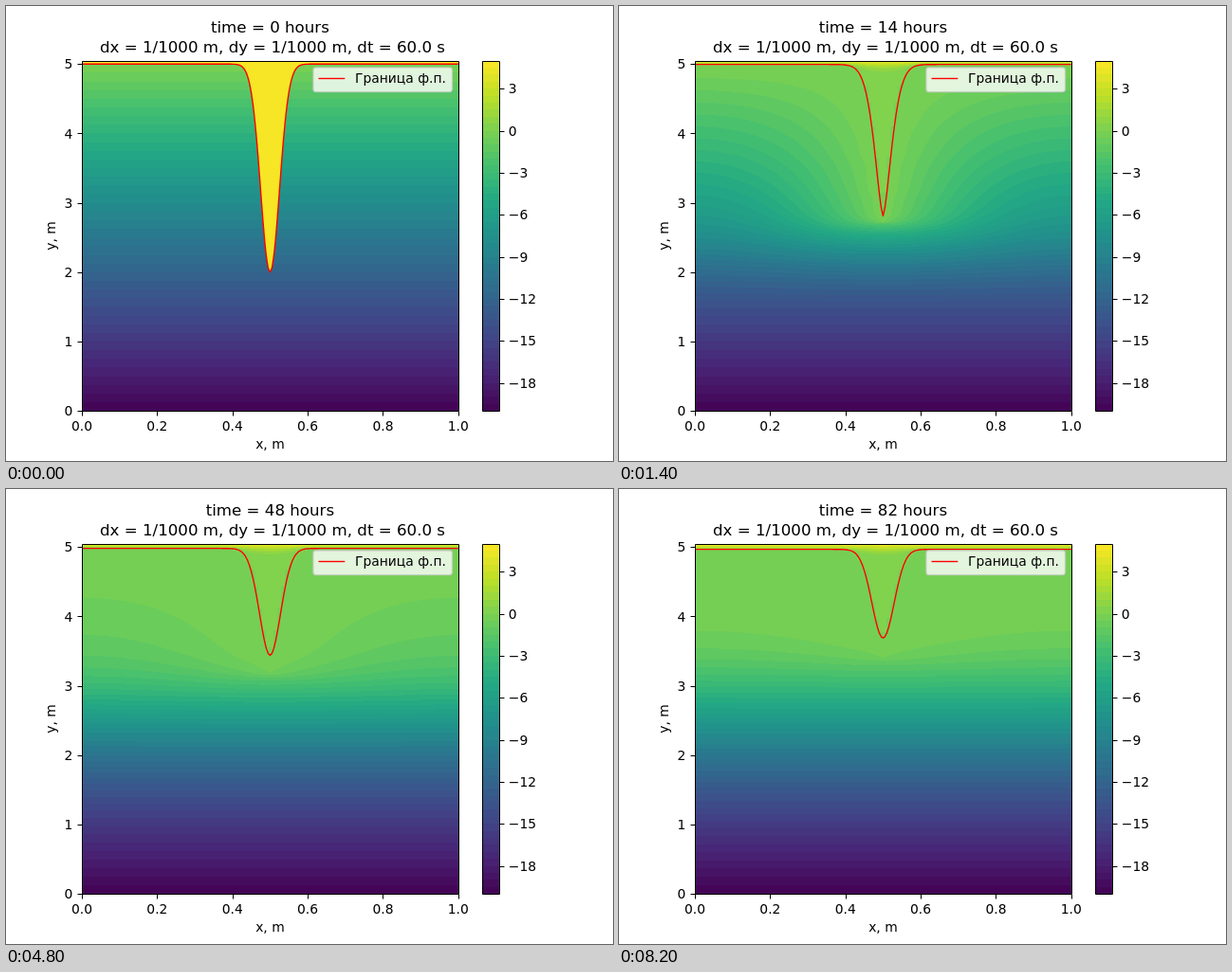
Animation of 640 by 480 pixels, one loop 8.4 s. Source, as an HTML page with a canvas:

```html
<!DOCTYPE html>
<html lang="ru">
<head>
<meta charset="utf-8">
<style>
  html, body { margin: 0; width: 100%; height: 100%; overflow: hidden; background: #fff; }
  canvas { display: block; }
</style>
</head>
<body>
<canvas id="stage" width="640" height="480"></canvas>
<script>
const ctx = document.getElementById('stage').getContext('2d');
const FRAMES = 42, FRAME_MS = 200, HOURS = 2;
const LEFT = 80, RIGHT = 476.8, TOP = 57.6, BOTTOM = 427.2, HEIGHT = 5.05;
const toX = x => LEFT + x * (RIGHT - LEFT);
const toY = y => BOTTOM - y / HEIGHT * (BOTTOM - TOP);
const snap = v => Math.floor(v + 0.5) + 0.5;

// Viridis, cut into half-degree bands from -20 to 5
const STOPS = [0x440154, 0x482475, 0x414487, 0x355f8d, 0x2a788e, 0x21918c,
  0x22a884, 0x44bf70, 0x7ad151, 0xbddf26, 0xfde725];
const BANDS = 50;
const palette = Array.from({ length: BANDS }, (_, i) => {
  const s = (i + 0.5) / BANDS * 10, k = Math.floor(s);
  return [16, 8, 0].map(b => {
    const lo = STOPS[k] >> b & 255, hi = STOPS[k + 1] >> b & 255;
    return Math.round(lo + (hi - lo) * (s - k));
  });
});
const band = t => palette[Math.max(0, Math.min(BANDS - 1, Math.floor((t + 20) * 2)))];

// Thawed wedge over time: hour, tip height, height of the -0.5 degree tip, width, exponent
const WEDGE = [
  [0, 2, 2, 0.0354, 2],
  [2, 2.28, 2.25, 0.033, 1.6],
  [8, 2.64, 2.58, 0.0311, 1.5],
  [22, 3.04, 2.88, 0.034, 1.6],
  [34, 3.31, 3.02, 0.038, 1.8],
  [48, 3.44, 3.17, 0.04, 1.95],
  [58, 3.52, 3.24, 0.041, 2],
  [82, 3.69, 3.39, 0.0417, 2]
];
function wedgeAt(hour) {
  const k = Math.max(1, WEDGE.findIndex(row => row[0] >= hour));
  const a = WEDGE[k - 1], b = WEDGE[k], s = (hour - a[0]) / (b[0] - a[0]);
  const [, tip, soft, width, power] = a.map((v, i) => v + (b[i] - v) * s);
  const top = 5 - 0.033 * hour / 82;
  const shape = x => Math.exp(-((Math.abs(x) / width) ** power));
  return {
    front: x => top - (top - tip) * shape(x),
    mush: x => top - (top - soft) * shape(x)
  };
}

// Heat conduction on the right half of the symmetric domain
const DX = 0.01, DY = 0.025, NX = 51, NY = 203;
const DT = 36, STEPS = HOURS * 3600 / DT;
const ICE = 1.05e-6 * DT, WATER = 1.4e-7 * DT, RX = 1 / DX ** 2, RY = 1 / DY ** 2;
const ground = y => -20 + 4 * y;

function simulate() {
  let now = new Float64Array(NX * NY);
  const start = wedgeAt(0);
  for (let j = 0; j < NY; j++)
    for (let i = 0; i < NX; i++)
      now[j * NX + i] = j * DY > start.front(i * DX) + 1e-9 ? 5 : ground(j * DY);
  let next = now.slice();
  const fields = [now.slice()];
  const front = new Float64Array(NX), mush = new Float64Array(NX);
  for (let n = 1; n < FRAMES; n++) {
    for (let s = 1; s <= STEPS; s++) {
      const wedge = wedgeAt((n - 1 + s / STEPS) * HOURS);
      for (let i = 0; i < NX; i++) {
        front[i] = wedge.front(i * DX);
        mush[i] = wedge.mush(i * DX);
      }
      for (let j = 1; j < NY - 1; j++) {
        const y = j * DY;
        for (let i = 0; i < NX; i++) {
          const k = j * NX + i, c = now[k];
          const l = now[i > 0 ? k - 1 : k + 1], r = now[i < NX - 1 ? k + 1 : k - 1];
          const flow = (l + r - 2 * c) * RX + (now[k - NX] + now[k + NX] - 2 * c) * RY;
          let v;
          if (y > front[i]) {
            v = c + WATER * flow;
            if (v < 0) v = 0;
          } else {
            v = c + ICE * flow;
            if (v > 0) v = 0;
            if (y > mush[i]) v = Math.max(v, -0.5 * (front[i] - y) / (front[i] - mush[i]));
          }
          next[k] = v;
        }
      }
      [now, next] = [next, now];
    }
    fields.push(now.slice());
  }
  return fields;
}
const fields = simulate();

function sample(field, x, y) {
  const u = Math.min(Math.abs(x) / DX, NX - 1.001), v = Math.max(0, Math.min(y / DY, NY - 1.001));
  const i = Math.floor(u), j = Math.floor(v), a = u - i, b = v - j, k = j * NX + i;
  return (field[k] * (1 - a) + field[k + 1] * a) * (1 - b)
    + (field[k + NX] * (1 - a) + field[k + NX + 1] * a) * b;
}

const image = ctx.createImageData(397, 370);
function drawField(n, wedge) {
  let p = 0;
  for (let py = 0; py < image.height; py++) {
    const y = (BOTTOM - py - 58.5) / (BOTTOM - TOP) * HEIGHT;
    for (let px = 0; px < image.width; px++) {
      const x = (px + 0.5) / (RIGHT - LEFT) - 0.5;
      const t = n ? sample(fields[n], x, y) : y > wedge.front(x) ? 5 : ground(y);
      const rgb = band(t);
      image.data[p++] = rgb[0];
      image.data[p++] = rgb[1];
      image.data[p++] = rgb[2];
      image.data[p++] = 255;
    }
  }
  ctx.putImageData(image, LEFT, 58);
}

function line(points, color, width) {
  ctx.beginPath();
  points.forEach(([x, y]) => ctx.lineTo(x, y));
  ctx.strokeStyle = color;
  ctx.lineWidth = width;
  ctx.stroke();
}

function text(str, x, y, align = 'center', size = 13.89) {
  ctx.font = `${size}px "DejaVu Sans", sans-serif`;
  ctx.textAlign = align;
  ctx.fillStyle = '#000';
  ctx.fillText(str, x, y);
}

function frameBox(x0, x1) {
  ctx.strokeStyle = '#000';
  ctx.lineWidth = 1;
  ctx.strokeRect(snap(x0), snap(TOP), snap(x1) - snap(x0), snap(BOTTOM) - snap(TOP));
}

function drawFront(wedge) {
  const points = [];
  for (let i = -100; i <= 100; i++) {
    const x = i / 200;
    points.push([toX(x + 0.5), toY(wedge.front(x))]);
  }
  ctx.lineJoin = 'round';
  line(points, '#f00', 1.39);
}

function drawAxes() {
  frameBox(LEFT, RIGHT);
  for (let i = 0; i <= 5; i++) {
    const x = snap(toX(i / 5)), y = snap(toY(i));
    line([[x, 428], [x, 432.5]], '#000', 1);
    text((i / 5).toFixed(1), toX(i / 5), 448);
    line([[75.5, y], [80, y]], '#000', 1);
    text(i, 70.3, toY(i) + 5.2, 'right');
  }
  text('x, m', 278.4, 467);
  ctx.save();
  ctx.translate(51.5, 242.4);
  ctx.rotate(-Math.PI / 2);
  text('y, m', 0, 0);
  ctx.restore();
}

function drawColorbar() {
  const h = (BOTTOM - TOP) / BANDS;
  palette.forEach((rgb, i) => {
    ctx.fillStyle = `rgb(${rgb})`;
    const y0 = Math.round(BOTTOM - (i + 1) * h), y1 = Math.round(BOTTOM - i * h);
    ctx.fillRect(502, y0, 18, y1 - y0);
  });
  frameBox(501.6, 520.1);
  for (let t = 3; t >= -18; t -= 3) {
    const y = TOP + (5 - t) * 2 * h;
    line([[521, snap(y)], [525.5, snap(y)]], '#000', 1);
    text(t < 0 ? '\u2212' + -t : t, 529.8, y + 5.2, 'left');
  }
}

function drawLegend() {
  ctx.beginPath();
  ctx.roundRect(324, 65, 146.4, 25.6, 2.8);
  ctx.fillStyle = 'rgba(255,255,255,0.8)';
  ctx.fill();
  ctx.strokeStyle = 'rgba(204,204,204,0.8)';
  ctx.lineWidth = 1.39;
  ctx.stroke();
  line([[329.5, 76.5], [357.3, 76.5]], '#f00', 1.39);
  text('Граница ф.п.', 368, 81, 'left');
}

function draw(n) {
  const wedge = wedgeAt(n * HOURS);
  ctx.fillStyle = '#fff';
  ctx.fillRect(0, 0, 640, 480);
  drawField(n, wedge);
  drawFront(wedge);
  drawAxes();
  drawColorbar();
  drawLegend();
  text(`time = ${n * HOURS} hours`, 278.4, 28, 'center', 16.67);
  text('dx = 1/1000 m, dy = 1/1000 m, dt = 60.0 s', 281, 49, 'center', 16.67);
}

let shown = 0;
draw(0);
const begin = performance.now();
function tick() {
  const n = Math.floor((performance.now() - begin) / FRAME_MS) % FRAMES;
  if (n !== shown) draw(shown = n);
  requestAnimationFrame(tick);
}
requestAnimationFrame(tick);
</script>
</body>
</html>
```
